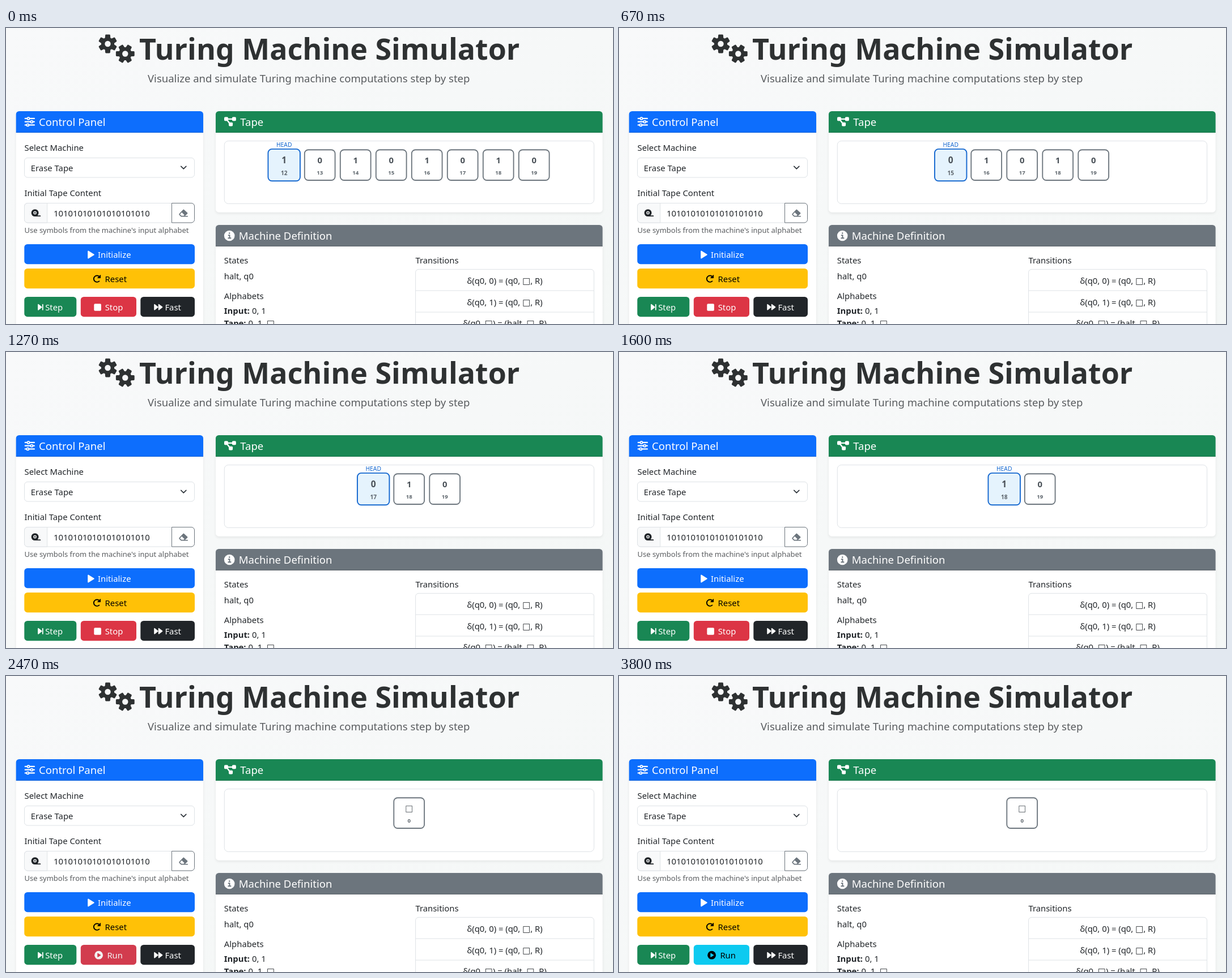
Recreate the animation shown at these times as an HTML page. Size 1071 by 523 pixels, loop 5400 ms.

```html
<!DOCTYPE html>
<html lang="en">
<head>
<meta charset="utf-8">
<title>Turing Machine Simulator</title>
<style>
  html, body { margin: 0; width: 100%; height: 100%; overflow: hidden; background: #f6f8f8; }
  svg { display: block; width: 1071px; height: 523px; }
  text { font: 14.83px "Noto Sans", "DejaVu Sans", sans-serif; fill: #212529; white-space: pre; }
  .title { font-size: 51.9px; font-weight: 700; fill: #2e3132; }
  .lead { font-size: 18.54px; fill: #595c5f; }
  .h { font-size: 18.54px; fill: #fff; }
  .hint { font-size: 12.98px; fill: #595c5f; }
  .w { fill: #fff; }
  .k { fill: #000; }
  .mid { text-anchor: middle; }
  .b, .sym, .idx { font-weight: 700; }
  .sym, .idx { text-anchor: middle; fill: #495057; }
  .idx { font-size: 9.64px; fill: #5c646b; }
  .head { font-size: 10.3px; text-anchor: middle; fill: #1769d0; }
  .line { fill: none; stroke: #dee2e6; }
  .card { fill: #fff; filter: drop-shadow(0 2px 2px rgba(0,0,0,.075)); }
  .cell { fill: #fff; stroke: #6c757d; stroke-width: 1.85; }
  .on { fill: #e5f3fd; stroke: #1769d0; }
</style>
</head>
<body>
<svg viewBox="0 0 1071 523">
  <defs>
    <linearGradient id="bg" x1="0" y1="0" x2="1" y2="1">
      <stop offset="0" stop-color="#f8f9fa"/><stop offset="1" stop-color="#f4f7f6"/>
    </linearGradient>
  </defs>
  <rect width="1071" height="523" fill="url(#bg)"/>

  <path id="gears" fill="#2e3132" stroke="#2e3132" stroke-width="3" stroke-linejoin="round"/>
  <g fill="#f7f8f9"><circle cx="179.5" cy="28" r="5.2"/><circle cx="210.3" cy="45.5" r="5.2"/></g>
  <text class="title" x="235" y="56.3">Turing Machine Simulator</text>
  <text class="lead" x="250" y="95.7">Visualize and simulate Turing machine computations step by step</text>

  <!-- cards -->
  <rect class="card" x="17.7" y="147" width="330.3" height="400" rx="5.5"/>
  <rect class="card" x="370" y="147" width="682.6" height="178.7" rx="5.5"/>
  <rect class="card" x="370" y="348" width="682.6" height="200" rx="5.5"/>
  <g id="bars"></g>

  <g transform="translate(32.6 156.4) scale(.0362)" fill="none" stroke="#fff" stroke-width="60" stroke-linecap="round">
    <path d="M32 96H130M254 96H480M32 256H290M414 256H480M32 416H98M222 416H480"/>
    <g stroke-width="48"><circle cx="192" cy="96" r="56"/><circle cx="352" cy="256" r="56"/><circle cx="160" cy="416" r="56"/></g>
  </g>
  <g transform="translate(385 156.2) scale(.0362)" fill="#fff">
    <rect y="32" width="192" height="192" rx="48"/><rect x="384" y="32" width="192" height="192" rx="48"/>
    <rect x="224" y="288" width="192" height="192" rx="48"/>
    <path d="M96 128H480M130 160L270 346" stroke="#fff" stroke-width="64"/>
  </g>
  <circle cx="394.2" cy="367" r="9.3" fill="#fff"/>
  <g fill="none" stroke="#6c757d" stroke-width="1.9" stroke-linecap="round">
    <path d="M392.6 366.2H394.5V371.2M392.2 371.3H396.6"/><path d="M394.2 362.5V362.6" stroke-width="2.4"/>
  </g>
  <text class="h" x="58" y="172.7">Control Panel</text>
  <text class="h" x="413.2" y="172.7">Tape</text>
  <text class="h" x="410.8" y="373.9">Machine Definition</text>

  <!-- control panel -->
  <text x="32.5" y="217">Select Machine</text>
  <rect class="line" x="32.5" y="229.5" width="300" height="34.5" rx="5.5"/>
  <text x="43.8" y="252.6">Erase Tape</text>
  <path d="M308.8 244.4L313.3 248.9L317.8 244.4" fill="none" stroke="#343a40" stroke-width="1.8" stroke-linecap="round" stroke-linejoin="round"/>
  <text x="32.5" y="296.7">Initial Tape Content</text>
  <rect class="line" x="32.5" y="309.5" width="300" height="34.5" rx="5.5"/>
  <path d="M72.7 309.5H38a5.5 5.5 0 0 0-5.5 5.5V338.5a5.5 5.5 0 0 0 5.5 5.5H72.7Z" fill="#f8f9fa" stroke="#dee2e6"/>
  <path d="M292.5 309.5H327a5.5 5.5 0 0 1 5.5 5.5V338.5a5.5 5.5 0 0 1-5.5 5.5H292.5Z" fill="#fff" stroke="#6c757d"/>
  <g transform="translate(44.6 319.2) scale(.029)" fill="#212529">
    <circle cx="224" cy="256" r="224"/><rect x="224" y="416" width="352" height="64" rx="32"/>
    <circle cx="224" cy="256" r="96" fill="#f8f9fa"/><circle cx="224" cy="256" r="44"/>
  </g>
  <g transform="translate(304.6 319.6) scale(.029)" fill="#6c757d">
    <path d="M330 46L536 238a34 34 0 0 1 0 48L392 428H544a26 26 0 0 1 0 52H150L42 372a60 60 0 0 1 0-84L270 46a44 44 0 0 1 60 0Z"/>
    <path d="M190 212L88 320a14 14 0 0 0 0 20L174 420H306L352 374Z" fill="#fff"/>
  </g>
  <text x="84" y="332.7">10101010101010101010</text>
  <text class="hint" x="32.5" y="362.3">Use symbols from the machine's input alphabet</text>

  <g id="buttons"></g>
  <path d="M145.2 394.6V406.4L154.8 400.5Z" fill="#fff" stroke="#fff" stroke-width="2" stroke-linejoin="round"/>
  <text class="w" x="162" y="406">Initialize</text>
  <path d="M164.6 439.2A5.7 5.7 0 1 0 164.4 447.4" fill="none" stroke="#000" stroke-width="1.9" stroke-linecap="round"/>
  <path d="M166.6 436.6V441.6H161.6Z" stroke="#000" stroke-linejoin="round"/>
  <text class="k" x="174.6" y="448.7">Reset</text>
  <path d="M57 488.6V497.8L62.6 493.2ZM64.8 488.6V497.8" fill="#fff" stroke="#fff" stroke-width="1.8" stroke-linejoin="round" stroke-linecap="round"/>
  <text class="w" x="69.2" y="498.7">Step</text>
  <path d="M262 488.6V497.8L267.8 493.2ZM269.6 488.6V497.8L275.6 493.2Z" fill="#fff" stroke="#fff" stroke-width="1.6" stroke-linejoin="round"/>
  <text class="w" x="280.4" y="498.7">Fast</text>
  <rect id="runBox" x="131.8" y="475" width="98.2" height="35.2" rx="5.5"/>
  <g id="stop">
    <rect x="155.3" y="487.2" width="12.6" height="12.6" rx="1.8" fill="#fff"/>
    <text class="w" x="174.7" y="498.7">Stop</text>
  </g>
  <g id="run">
    <circle cx="163.6" cy="493.2" r="7.4"/>
    <path id="runMark" d="M161.9 490.2V496.2L166.7 493.2Z" stroke-width="1.2" stroke-linejoin="round"/>
    <text x="178.4" y="498.7" style="fill:inherit">Run</text>
  </g>

  <!-- tape -->
  <rect class="line" x="385.3" y="199.6" width="652.2" height="110.8" rx="7"/>
  <g id="tape"></g>

  <!-- definition -->
  <text x="384.8" y="415.5">States</text>
  <text x="384.8" y="443.6">halt, q0</text>
  <text x="384.8" y="478.8">Alphabets</text>
  <text x="384.8" y="505.4"><tspan class="b">Input:</tspan> 0, 1</text>
  <text x="384.8" y="527.4"><tspan class="b">Tape:</tspan> 0, 1, □</text>
  <text x="722.4" y="415.5">Transitions</text>
  <rect class="line" x="722.6" y="426.4" width="314.8" height="130" rx="5.5"/>
  <path class="line" d="M722.6 464H1037.4M722.6 502H1037.4"/>
  <text class="mid" x="880" y="451.7">δ(q0, 0) = (q0, □, R)</text>
  <text class="mid" x="880" y="489.7">δ(q0, 1) = (q0, □, R)</text>
  <text class="mid" x="880" y="527.4">δ(q0, □) = (halt, □, R)</text>
</svg>
<script>
const $ = id => document.getElementById(id);

// Six-toothed gear outline; turn is the angle of the first tooth in degrees.
function gear(cx, cy, turn) {
  const pts = [];
  for (let i = 0; i < 6; i++) {
    for (const [da, r] of [[-19, 10.2], [-11, 15.2], [11, 15.2], [19, 10.2]]) {
      const a = (turn + i * 60 + da) * Math.PI / 180;
      pts.push((cx + r * Math.cos(a)).toFixed(2) + ' ' + (cy + r * Math.sin(a)).toFixed(2));
    }
  }
  return 'M' + pts.join('L') + 'Z';
}
$('gears').setAttribute('d', gear(179.5, 28, 90) + gear(210.3, 45.5, 0));

const bar = (x, y, w, color) =>
  `<path d="M${x} ${y + 38}v-32.5a5.5 5.5 0 0 1 5.5-5.5h${w - 11}a5.5 5.5 0 0 1 5.5 5.5v32.5Z" fill="${color}"/>` +
  `<rect x="${x}" y="${y + 37}" width="${w}" height="1" fill="#000" fill-opacity=".15"/>`;
$('bars').innerHTML = bar(17.7, 147, 330.3, '#0d6efd') + bar(370, 147, 682.6, '#198754') + bar(370, 348, 682.6, '#6c757d');

const button = (x, y, w, color) => `<rect x="${x}" y="${y}" width="${w}" height="35.2" rx="5.5" fill="${color}"/>`;
$('buttons').innerHTML = button(32.3, 382, 300.7, '#0d6efd') + button(32.3, 425, 300.7, '#ffc107') +
  button(32.3, 475, 92, '#198754') + button(237.3, 475, 95.7, '#212529');

const LOOP = 5400, FIRST = 12, LAST = 19, PITCH = 63, MID = 711.2;
const STEPS = [0, 70, 400, 670, 1000, 1270, 1600, 1870, 2200, 2470];
const FADE = [[2470, .05], [2530, .85], [2600, .99], [2670, 1]];

function cell(x, symbol, index, isHead) {
  const scale = isHead ? 1.05 : 1;
  return `<g transform="translate(${x} 242.1) scale(${scale})">
    <rect class="cell${isHead ? ' on' : ''}" x="-26.9" y="-26.9" width="53.8" height="53.8" rx="6.5"/>
    <text class="sym" y="-2.8">${symbol}</text><text class="idx" y="17.4">${index}</text></g>` +
    (isHead ? `<text class="head" x="${x}" y="209.6">HEAD</text>` : '');
}

function drawTape(step) {
  const head = FIRST + step;
  if (step === STEPS.length - 1) return cell(MID, '□', 0, false);
  if (head > LAST) return cell(MID, '□', head, true);
  const n = LAST - head + 1;
  let out = '';
  for (let i = 0; i < n; i++) {
    const index = head + i;
    out += cell(MID + PITCH * (i - (n - 1) / 2), 1 - index % 2, index, i === 0);
  }
  return out;
}

const mix = (a, b, k) => `rgb(${a.map((v, i) => Math.round(v + (b[i] - v) * k))})`;
let shown = -1;

function render(t) {
  const step = STEPS.filter(s => s <= t).length - 1;
  if (step !== shown) $('tape').innerHTML = drawTape(shown = step);
  const halted = t >= 2470;
  const k = FADE.reduce((v, [at, amount]) => t >= at ? amount : v, 0);
  const box = mix([220, 53, 69], [13, 202, 240], k);
  $('runBox').style.fill = box;
  $('run').style.fill = mix([255, 255, 255], [0, 0, 0], k);
  $('runMark').style.fill = $('runMark').style.stroke = box;
  $('stop').style.display = halted ? 'none' : '';
  $('run').style.display = halted ? '' : 'none';
}

const start = performance.now();
function tick() {
  render((performance.now() - start) % LOOP);
  requestAnimationFrame(tick);
}
tick();
</script>
</body>
</html>
```
